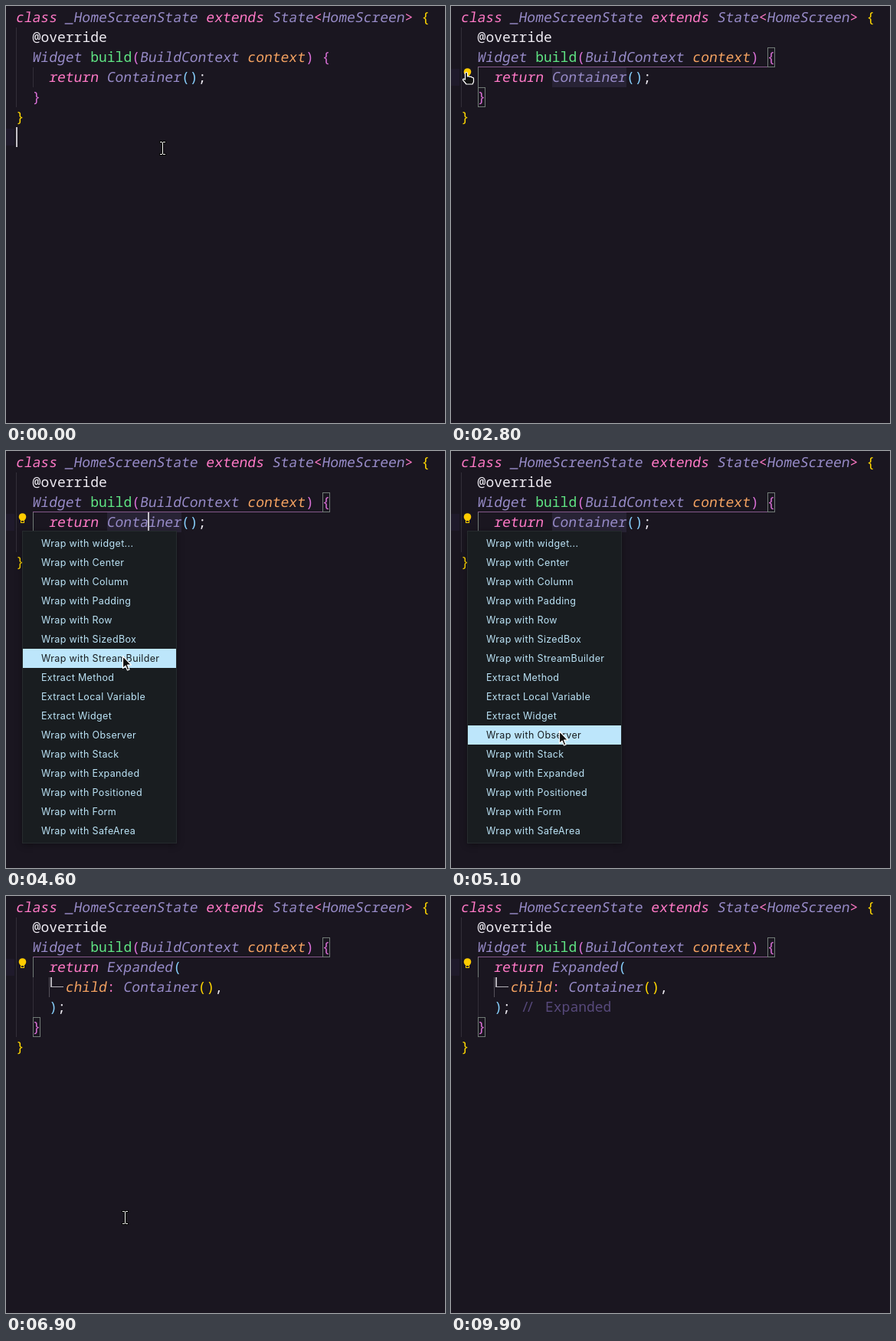
An HTML page with a canvas that plays this animation: 573x544 px, repeating every 10000 ms.

```html
<!DOCTYPE html>
<html lang="en">
<head>
<meta charset="utf-8">
<title>Wrap with widget</title>
<style>
html, body { margin: 0; width: 100%; height: 100%; overflow: hidden; background: #1a1620; }
canvas { display: block; }
</style>
</head>
<body>
<canvas id="stage" width="573" height="544"></canvas>
<script>
const ctx = document.getElementById('stage').getContext('2d');

const LOOP = 10000, STEP = 100;
const LEFT = 13, TOP = 2, CHAR = 10.8, LINE = 26;
const CLICK = 1300, BULB = 1500, MENU_OPEN = 3400, MENU_CLOSE = 6300;
const WRAPPED = 6400, FORMATTED = 6800, LABEL = 7200;
const MENU = { x: 22, y: 105, w: 200, h: 406, first: 108, row: 25 };
const GUIDE = '#322e38', ACTIVE = '#717b76', BRACKET_GUIDE = '#85588a';

// Upper-case keys are slanted.
const COLORS = {
  K: '#ff79c6', k: '#ff79c6', T: '#978bc8', w: '#eeebf2', f: '#5fe483',
  P: '#f4a261', y: '#ffd700', o: '#da70d6', b: '#87cefa', c: '#57497b'
};

const HEAD = [
  [0, 'K', 'class ', 'T', '_HomeScreenState ', 'K', 'extends ', 'T', 'State', 'k', '<',
    'T', 'HomeScreen', 'k', '>', 'y', ' {'],
  [2, 'w', '@override'],
  [2, 'T', 'Widget ', 'f', 'build', 'o', '(', 'T', 'BuildContext ', 'P', 'context', 'o', ') {']
];
const TAIL = [[2, 'o', '}'], [0, 'y', '}']];
const CHILD = ['P', 'child', 'k', ': ', 'T', 'Container', 'y', '()', 'w', ','];
const BODY = {
  plain: [[4, 'K', 'return ', 'T', 'Container', 'b', '()', 'w', ';']],
  inline: [[4, 'K', 'return ', 'T', 'Expanded', 'b', '(', ...CHILD, 'b', ')', 'w', ';']],
  formatted: [
    [4, 'K', 'return ', 'T', 'Expanded', 'b', '('],
    [6, ...CHILD],
    [4, 'b', ')', 'w', ';']
  ]
};

const wrap = name => 'Wrap with ' + name;
const ITEMS = [
  ...['widget...', 'Center', 'Column', 'Padding', 'Row', 'SizedBox', 'StreamBuilder'].map(wrap),
  'Extract Method', 'Extract Local Variable', 'Extract Widget',
  ...['Observer', 'Stack', 'Expanded', 'Positioned', 'Form', 'SafeArea'].map(wrap)
];

// time, x, y, and whether the move towards this point is eased
const PATH = [
  [0, 204, 185], [400, 204, 185], [1100, 186, 91, true], [1600, 186, 91],
  [2400, 22, 88, true], [2700, 22, 88], [2800, 20, 87], [3800, 20, 87],
  [4100, 80, 143], [4600, 153, 267], [4900, 150, 322], [5100, 142, 365],
  [5600, 155, 419, true], [8500, 155, 419], [9200, 53, -12, true], [LOOP, 53, -12]
];

const BLINKS = [500, 1000, 1800, 2300, 2800, 3300, 3900, 4300, 4800, 5300,
  5800, 6300, 6900, 7400, 7800, 8300, 8800, 9400, 9900];

const colX = col => LEFT + col * CHAR;
const lineY = line => TOP + line * LINE;

function rect(color, x, y, w, h) {
  ctx.fillStyle = color;
  ctx.fillRect(x, y, w, h);
}

function frame(color, x, y, w, h) {
  ctx.strokeStyle = color;
  ctx.lineWidth = 1;
  ctx.strokeRect(x + .5, y + .5, w - 1, h - 1);
}

function code(text, key, x, baseline) {
  const slanted = key < 'a';
  ctx.save();
  ctx.font = '18px "Noto Sans Mono", "DejaVu Sans Mono", monospace';
  ctx.fillStyle = COLORS[key];
  ctx.transform(1, 0, slanted ? -.16 : 0, 1, x - (slanted ? .8 : 0), baseline);
  ctx.fillText(text, 0, 0);
  ctx.restore();
}

function codeLine([col, ...parts], line) {
  for (let i = 0; i < parts.length; i += 2) {
    code(parts[i + 1], parts[i], colX(col), lineY(line) + 19);
    col += parts[i + 1].length;
  }
}

function pointerAt(t) {
  const i = PATH.findIndex(p => p[0] > t);
  const [t0, x0, y0] = PATH[i - 1], [t1, x1, y1, eased] = PATH[i];
  let u = (t - t0) / (t1 - t0);
  if (eased) u = u * u * (3 - 2 * u);
  return { x: Math.round(x0 + (x1 - x0) * u), y: Math.round(y0 + (y1 - y0) * u) };
}

function caretVisible(t) {
  const flips = BLINKS.filter(b => b <= t).length;
  return flips % 2 === 0;
}

function drawEditor(t) {
  const clicked = t >= CLICK;
  const formatted = t >= FORMATTED;
  const body = formatted ? BODY.formatted : t >= WRAPPED ? BODY.inline : BODY.plain;
  const lines = [...HEAD, ...body, ...TAIL];
  const close = HEAD.length + body.length;

  rect('#1f1a2b', 0, lineY(clicked ? 3 : 6) + 2, 11, 22);
  if (t >= BULB && t < WRAPPED) rect('#282335', 132, lineY(3), 97, LINE);

  rect(GUIDE, 13, lineY(1), 1, lineY(close + 1) - lineY(1));
  rect(GUIDE, 35, lineY(3), 1, lineY(close) - lineY(3));

  if (clicked) {
    rect(BRACKET_GUIDE, 35, lineY(3) - 1, 378, 1);
    rect(ACTIVE, 35, lineY(3), 1, LINE);
    frame(ACTIVE, 413, lineY(2), 10, LINE);
    frame(ACTIVE, 35, lineY(close), 10, LINE);
  }
  if (formatted) {
    rect('#55515a', 56, lineY(4), 1, LINE);
    rect('#b5b2b9', 58, lineY(4), 2, 13);
    rect('#b5b2b9', 58, lineY(4) + 12, 17, 1);
  }

  lines.forEach(codeLine);

  if (t >= LABEL) {
    const y = lineY(5) + 19;
    code('/', 'c', 91.5, y);
    code('/', 'c', 98, y);
    code('Expanded', 'c', 123, y);
  }
  if (caretVisible(t)) {
    rect('#c4c1c8', clicked ? 185 : 13, lineY(clicked ? 3 : 6), 2, LINE);
  }
  if (t >= BULB) drawBulb();
}

function drawBulb() {
  ctx.fillStyle = '#ffcc00';
  ctx.beginPath();
  ctx.arc(21.5, 86, 4.8, 0, 7);
  ctx.fill();
  rect('#ffcc00', 19, 88, 5, 6);
  rect('#1a1620', 20, 91, 3, 2);
}

function drawMenu(pointer) {
  const { x, y, w, h, first, row } = MENU;
  ctx.save();
  ctx.shadowColor = 'rgba(0,0,0,.36)';
  ctx.shadowBlur = 8;
  ctx.shadowOffsetY = 2;
  rect('#262b2e', x - 1, y - 1, w + 2, h + 2);
  ctx.restore();
  rect('#191d20', x, y, w, h);

  const active = pointer.x >= x ? Math.floor((pointer.y - first) / row) : -1;
  ctx.save();
  ctx.font = '12.5px Inter, sans-serif';
  ctx.letterSpacing = '0.35px';
  ITEMS.forEach((item, i) => {
    const top = first + i * row;
    if (i === active) rect('#bde6fb', x, top, w, row);
    ctx.fillStyle = i === active ? '#191d20' : '#bbe3f6';
    ctx.fillText(item, 46, top + 17);
  });
  ctx.restore();
}

function drawBeam(x, y) {
  const bars = [[-3, -8, 3, 1], [1, -8, 3, 1], [0, -7, 1, 15], [-3, 8, 3, 1], [1, 8, 3, 1]];
  for (const [bx, by, w, h] of bars) rect('#000', x + bx - 1, y + by - 1, w + 2, h + 2);
  for (const [bx, by, w, h] of bars) rect('#fff', x + bx, y + by, w, h);
}

function drawOutlined(path, x, y) {
  ctx.save();
  ctx.translate(x, y);
  const shape = new Path2D(path);
  ctx.lineJoin = 'round';
  ctx.lineWidth = 1.2;
  ctx.fillStyle = '#111';
  ctx.strokeStyle = '#fff';
  ctx.fill(shape);
  ctx.stroke(shape);
  ctx.restore();
}

function drawPointer({ x, y }, t) {
  if (t >= MENU_OPEN && t < MENU_CLOSE) {
    drawOutlined('M0 .5V16.5L3.6 13.2L6 19L8.5 17.9L6.1 12.2H11Z', x - .5, y);
  } else if (t >= BULB && x < 28) {
    drawOutlined('M-1.5 9V.5Q0-1.5 1.5 .5V5Q3.5 4 4.5 5.5Q6.5 4.7 7.3 6.3' +
      'Q9.5 6 9.5 8V12L8 15H0L-4.5 9.5Q-4.5 7-1.5 9Z', x, y);
  } else {
    drawBeam(x, y);
  }
}

function draw(now) {
  const t = Math.floor(now % LOOP / STEP) * STEP;
  const pointer = pointerAt(t);
  rect('#1a1620', 0, 0, 573, 544);
  drawEditor(t);
  if (t >= MENU_OPEN && t < MENU_CLOSE) drawMenu(pointer);
  drawPointer(pointer, t);
}

let start;
function tick(now) {
  start ??= now;
  draw(now - start);
  requestAnimationFrame(tick);
}
draw(0);
requestAnimationFrame(tick);
</script>
</body>
</html>
```
